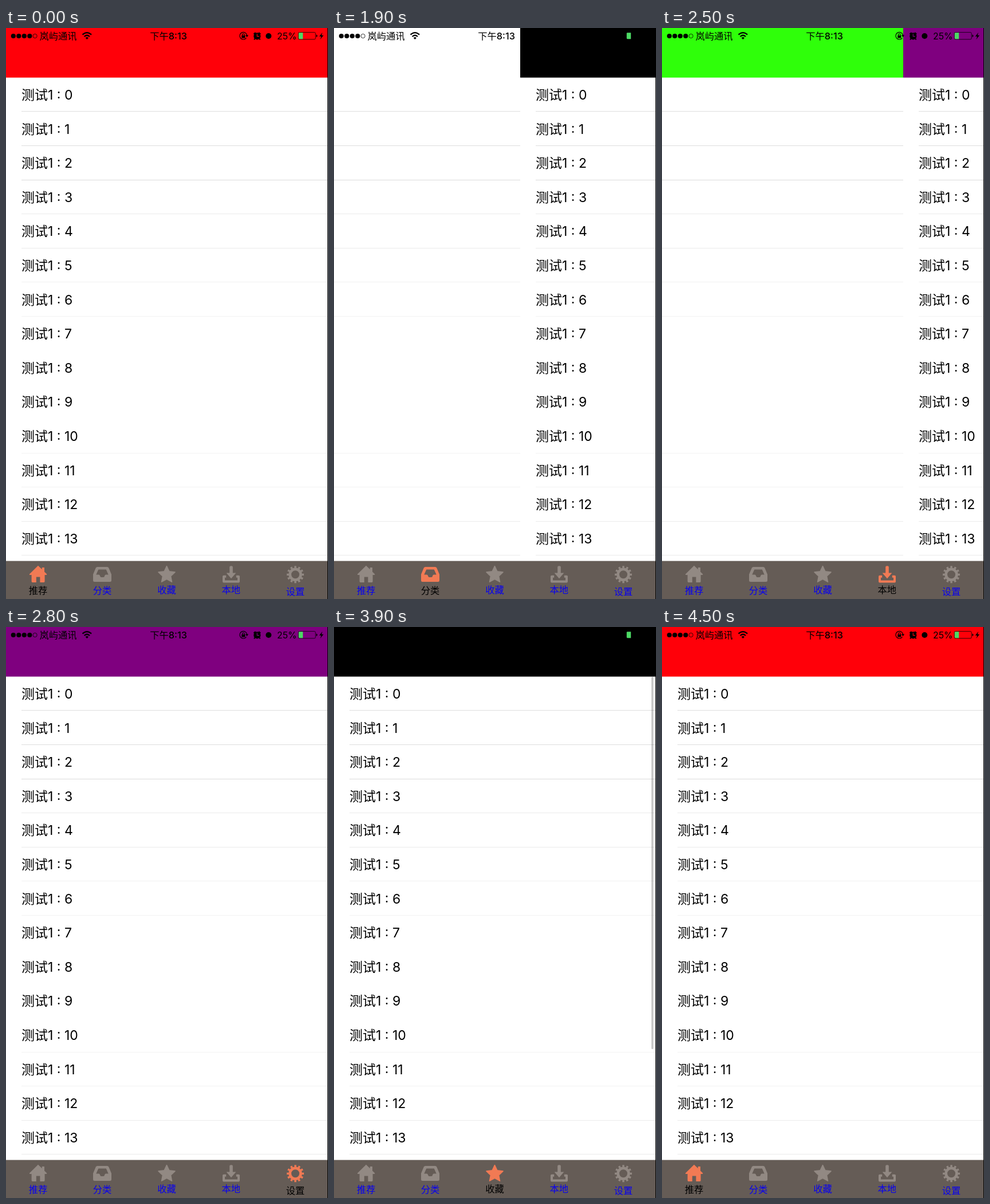
These frames come from a looping animation (562x997 px, 4800 ms). An HTML page:

```html
<!DOCTYPE html>
<html lang="zh-CN">
<head>
<meta charset="utf-8">
<title>Tab pages</title>
<style>
html, body { margin: 0; width: 100%; height: 100%; overflow: hidden; background: #fff; }
svg { display: block; width: 100vw; height: 100vh; }
text { font-family: Inter, "Noto Sans CJK SC", "Noto Sans CJK", sans-serif; white-space: pre; }
.row { font-size: 23px; }
.status text { font-size: 16.3px; }
.tab { color: #928983; }
.tab text { font-size: 16.3px; text-anchor: middle; fill: #0800f0; }
.tab.on { color: #f17a54; }
.tab.on text { fill: #000; }
.fill { fill: currentColor; }
.line { fill: none; stroke: currentColor; }
</style>
</head>
<body>
<svg viewBox="0 0 562 997" preserveAspectRatio="none">
  <g id="pages"></g>

  <g class="status">
    <g id="signal"></g>
    <text x="58.5" y="20">岚屿通讯</text>
    <g fill="none" stroke="#000" stroke-width="2.3">
      <path d="M133.5 11.7Q141.3 4.6 149.1 11.7"/>
      <path d="M136.6 15Q141.3 10.6 146 15"/>
    </g>
    <path d="M138.7 17.2Q141.3 14.8 143.9 17.2L141.3 20Z"/>
    <text x="283.5" y="20" text-anchor="middle" font-weight="500">下午8:13</text>

    <path d="M419.4 17.3A6.3 6.3 0 1 1 420.5 13" fill="none" stroke="#000" stroke-width="1.2"/>
    <path d="M417.8 12.6H423.2L420.5 16Z"/>
    <rect x="411.3" y="13" width="6" height="4.6" rx=".5"/>
    <path d="M412.5 13.4V11.8a1.8 1.8 0 0 1 3.6 0V13.4" fill="none" stroke="#000" stroke-width="1.1"/>

    <path fill-rule="evenodd" d="M432.2 14.3a6.1 6.1 0 1 0 12.2 0a6.1 6.1 0 1 0 -12.2 0ZM437.7 10.3H438.9V14H442V15.2H437.7Z"/>
    <path d="M432.4 10.6L435.6 8M444.2 10.6L441 8M434.4 18.6L433 20.3M442.2 18.6L443.6 20.3" stroke="#000" stroke-width="2"/>

    <circle cx="458.3" cy="14" r="5"/>
    <text x="473" y="20" style="font-size:15.8px">25%</text>
    <rect x="510.2" y="7.6" width="30" height="12.2" rx="2" fill="none" stroke="#000" stroke-width=".8"/>
    <path d="M541.5 11.5q2 .5 2 2.2t-2 2.2Z"/>
    <path d="M512.2 8.2H518.2V19.2H512.2Q510.8 19.2 510.8 17.8V9.6Q510.8 8.2 512.2 8.2Z" fill="#4cd964"/>
    <path d="M552.2 7.8L546.8 14.7H550.2L548.4 20L554.2 12.8H550.7Z"/>
  </g>

  <rect y="930.6" width="562" height="67" fill="#655c56"/>
  <g class="tab">
    <path class="fill" d="M56 938.8L62.8 945.3V942H67V949.4L71.2 953.4Q71.8 955 70 955H67.6V966.3Q67.6 968 66 968H59.4V958.6H52.8V968H46.2Q44.6 968 44.6 966.3V955H42Q40.2 955 41 953.4Z"/>
    <text x="56" y="988">推荐</text>
  </g>
  <g class="tab">
    <path class="fill" fill-rule="evenodd" d="M159.5 941H176.5Q178.3 941 179.2 942.6L184 954V964.5Q184 967 181.5 967H154.5Q152 967 152 964.5V954L156.8 942.6Q157.7 941 159.5 941ZM161.3 945.6L157.3 954.4H161.8Q163.6 954.4 164 956.4T166 959H170Q171.7 959 172.1 956.7T174.2 954.4H178.7L174.7 945.6Z"/>
    <text x="168" y="988">分类</text>
  </g>
  <g class="tab">
    <path class="fill line" id="star" style="fill:currentColor" stroke-width="1.6" stroke-linejoin="round"/>
    <text x="280.5" y="987">收藏</text>
  </g>
  <g class="tab">
    <path class="fill" d="M390.2 941.2Q390.2 939.2 393 939.2T395.8 941.2V951.5H401.4L393 961.2L384.6 951.5H390.2Z"/>
    <path class="line" stroke-width="4" stroke-linejoin="round" d="M384.2 957.8H380V966.6H406V957.8H401.8"/>
    <text x="392.7" y="987">本地</text>
  </g>
  <g class="tab">
    <circle class="line" cx="505" cy="954.3" r="9.4" stroke-width="4.8"/>
    <circle class="line" cx="505" cy="954.3" r="13" stroke-width="4" pathLength="24" stroke-dasharray="1 1" stroke-dashoffset=".5"/>
    <text x="505" y="990">设置</text>
  </g>
  <rect x="561" width="1" height="997"/>
</svg>
<script>
const LOOP = 4800, STEP = 100, W = 561, ROW = 59.62;
const COLORS = ['#ff0009', '#fff', '#000', '#2fff0a', '#7f007f'];
// separators fade out towards the middle of the list
const LINES = ['#dedede', '#dedede', '#dadada', '#ebebeb', '#ebebeb', '#f2f2f2', '#f3f3f3',
  '#fff', '#fff', '#fff', '#f3f3f3', '#f2f2f2', '#ebebeb', '#ebebeb'];
// start, duration, from page, to page
const SWIPES = [
  [1580.4, 280, 0, 1], [1860, 240, 1, 2],
  [2203, 180, 2, 3], [2470, 330, 3, 4],
  [3352.1, 200, 4, 3], [3540, 160, 3, 2],
  [3960, 200, 2, 1], [4270, 130, 1, 0]
];
const FLASH = [3900, 4500];

const $ = id => document.getElementById(id);

function pageMarkup(color, n) {
  let s = `<g transform="translate(${n * W} 0)"><rect width="${W}" height="997" fill="#fff"/>` +
    `<rect width="${W}" height="86.6" fill="${color}"/>`;
  LINES.forEach((c, i) => {
    const y = Math.floor(146.2 + i * ROW - 0.3);
    s += `<text class="row" x="27" y="${(124.9 + i * ROW).toFixed(2)}">测试1 : ${i}</text>` +
      `<rect x="27" y="${y}" width="${W - 27}" height="1" fill="${c}"/>`;
  });
  return s + '<rect class="bar" x="554" y="87" width="3.4" height="650" rx="1.6" fill="#000" opacity=".22"/></g>';
}

function starPath(cx, cy, outer, inner) {
  let d = '';
  for (let i = 0; i < 10; i++) {
    const a = i * Math.PI / 5, r = i % 2 ? inner : outer;
    d += `${i ? 'L' : 'M'}${(cx + r * Math.sin(a)).toFixed(2)} ${(cy - r * Math.cos(a)).toFixed(2)}`;
  }
  return d + 'Z';
}

$('pages').innerHTML = COLORS.map(pageMarkup).join('');
$('star').setAttribute('d', starPath(280.5, 954.8, 15.2, 7.4));
$('signal').innerHTML = [0, 1, 2, 3, 4].map(i => i < 4
  ? `<circle cx="${12.8 + i * 9.5}" cy="14" r="4.1"/>`
  : '<circle cx="50.6" cy="14" r="3.6" fill="none" stroke="#000" stroke-width=".8"/>').join('');

const tabs = document.querySelectorAll('.tab');
const bars = document.querySelectorAll('.bar');

function offsetAt(t) {
  let pos = 0;
  for (const [start, dur, from, to] of SWIPES) {
    if (t < start) break;
    const u = Math.min(1, (t - start) / dur);
    pos = from + (to - from) * (1 - (1 - u) ** 3);
  }
  return pos;
}

function draw(time) {
  const t = Math.floor((time % LOOP) / STEP) * STEP;
  const pos = offsetAt(t);
  $('pages').setAttribute('transform', `translate(${-Math.round(pos * W)} 0)`);
  tabs.forEach((tab, i) => tab.classList.toggle('on', i === Math.floor(pos)));
  const shown = t >= FLASH[0] && t < FLASH[1];
  bars.forEach(bar => bar.setAttribute('visibility', shown ? 'visible' : 'hidden'));
}

const begin = performance.now();
function tick() {
  draw(performance.now() - begin);
  requestAnimationFrame(tick);
}
tick();
</script>
</body>
</html>
```
